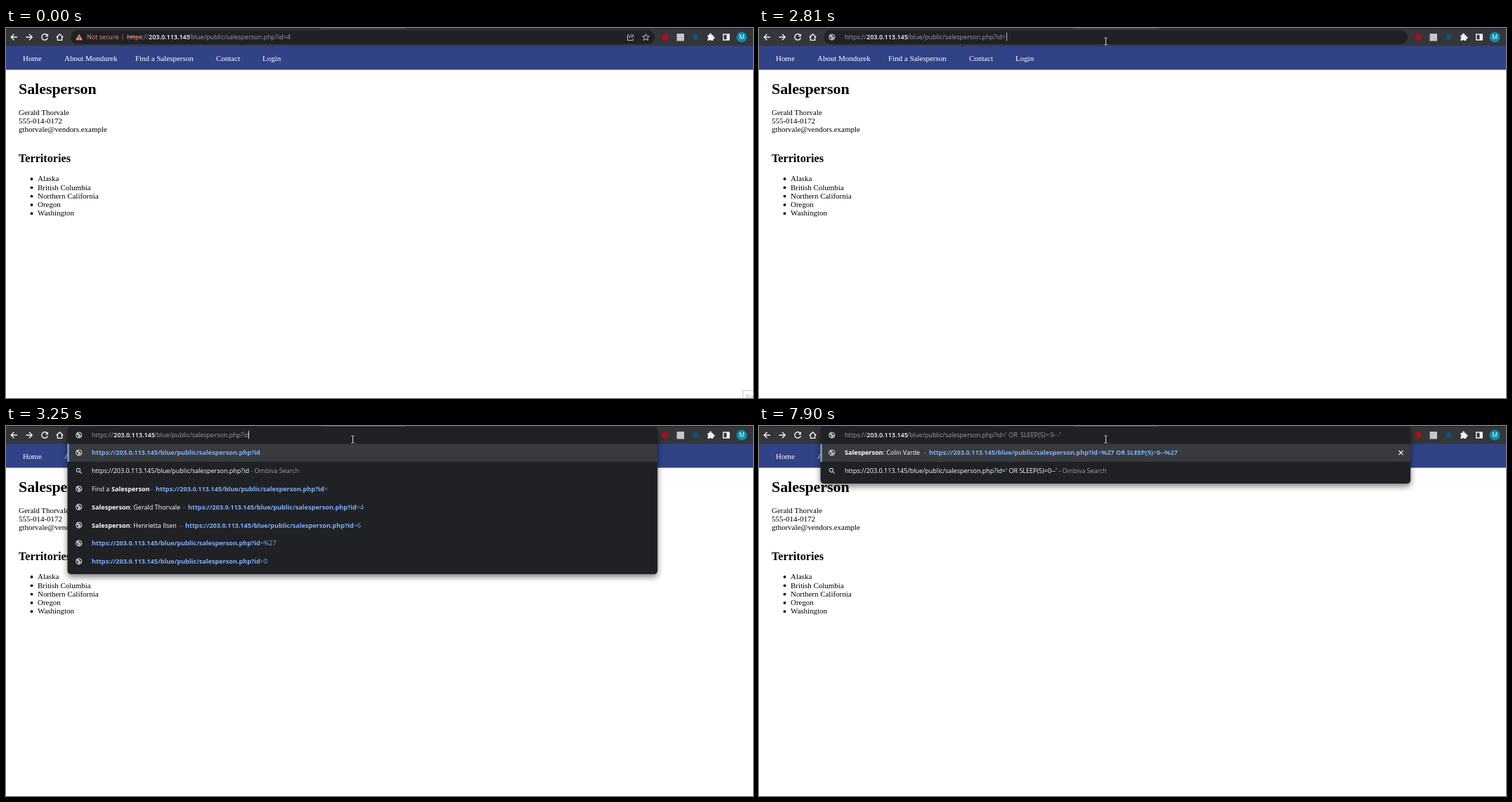
Write an HTML page that moves like this. It is 1063 px wide and 527 px high and loops after 8 s.

```html
<!DOCTYPE html>
<html lang="en">
<head>
<meta charset="utf-8">
<title>Salesperson</title>
<style>
  html, body { margin: 0; width: 100%; height: 100%; overflow: hidden; background: #fff; }
  svg { display: block; }
  text { white-space: pre; }
  .page { font: 10.95px "Liberation Serif", "Times New Roman", serif; fill: #000; }
  .page .nav { fill: #fff; }
  .page .h1 { font-size: 21.9px; font-weight: bold; }
  .page .h2 { font-size: 16.2px; font-weight: bold; }
  .ui { font: 9px "Open Sans", "Noto Sans", sans-serif; fill: #fff; }
  .b { font-size: 9.1px; font-weight: bold; }
  .host { font-weight: 600; fill: #fff; }
  .grey { fill: #9aa0a6; }
  .warn { fill: #ee907f; }
  .strike { text-decoration: line-through; }
  .link { fill: #7cb0ff; }
  .selected tspan { fill: #fff; }
  .line { fill: none; stroke: #f1f3f4; stroke-width: 1.4; }
  #popup { filter: drop-shadow(0 4px 4px rgba(0, 0, 0, .5)); }
</style>
</head>
<body>
<svg width="1063" height="527" viewBox="0 0 1063 527">
  <defs>
    <g id="globe">
      <circle r="4.6" fill="#c4c7cb"/>
      <path d="M-3.6-1.5L-1 .2-.6 2.2-2 3.4Q-4-.2-3.6-1.5ZM0-3.8L3-2 3.6.8 1.6.2.8-1.6-.8-2ZM1 2L3 1.8 1.4 3.6Z" fill="#35373b"/>
    </g>
    <g id="lens" fill="none" stroke="#c4c7cb" stroke-width="1.1">
      <circle cx="-.8" cy="-.8" r="2.6"/><path d="M1.2 1.2L4 4"/>
    </g>
  </defs>

  <g class="page" id="page">
    <rect y="25" width="1063" height="34.500" fill="#324287"/>
  </g>

  <g id="toolbar">
    <rect width="1063" height="25.5" fill="#35363a"/>
    <rect width="1063" height="1" fill="#202124"/>
    <rect x="448" width="120" height="1" fill="#4a4b4f"/>
    <rect id="pill" x="92" y="3" width="831" height="20" rx="10" fill="#202124"/>
    <path class="line" d="M16 13H7.500M11.500 8.800L7.300 13l4.200 4.200M28.500 13H37M33 8.800L37.200 13 33 17.200"/>
    <path class="line" d="M58.600 10.200A4.300 4.300 0 1 0 59.300 14"/>
    <path d="M60 8V12.200H55.800Z" fill="#f1f3f4"/>
    <path class="line" d="M71.800 13.300L76.500 8.700 81.200 13.300M73.400 12V17.400H79.600V12"/>
    <circle cx="938" cy="13" r="4.800" fill="#a3121c"/>
    <rect x="954.500" y="8" width="10.500" height="10.500" fill="#c6c6c6"/>
    <circle cx="981.500" cy="13" r="4.200" fill="#0b5577"/>
    <path d="M998.500 10H1001A1.700 1.700 0 1 1 1004 10H1006.300V12.300A1.700 1.700 0 1 1 1006.300 15.500V18H1003.600A1.500 1.500 0 0 0 1000.800 18H998.500V15.200A1.500 1.500 0 0 0 998.500 12.500Z" fill="#f1f3f4"/>
    <path class="line" d="M1020.700 9H1029V17H1020.700Z"/>
    <rect x="1025.500" y="9" width="4" height="8" fill="#f1f3f4"/>
    <circle cx="1047" cy="13" r="7.600" fill="#078bab"/>
    <text class="ui" x="1047" y="16.300" text-anchor="middle">M</text>
  </g>

  <g id="popup" class="ui"></g>
  <g id="bar" class="ui"></g>
  <rect id="caret" y="6.5" width="1" height="12" fill="#b4b7bb"/>

  <g id="tip">
    <rect x="1048.500" y="516.500" width="30" height="20" fill="#fff" stroke="#c8c8c8"/>
    <text class="ui" x="1053" y="529" style="fill:#aaa">Pa</text>
  </g>
  <path id="arrow" d="M0 0V11.300L2.700 8.900 4.400 12.700 6.200 11.900 4.500 8.200H8Z" fill="#fff" stroke="#222" stroke-width=".7"/>
  <path id="beam" d="M-2.200-5H-.6L0-4.500.6-5H2.200M0-4.500V4.500M-2.200 5H-.6L0 4.500.6 5H2.200" fill="none" stroke="#d5d5d5"/>
</svg>
<script>
const $ = id => document.getElementById(id);
const HOST = "203.0.113.145", PATH = "/blue/public/salesperson.php";
const BASE = "https://" + HOST + PATH;
const OR = "=' OR ", SLEEP = "SLEEP(5", TAIL = ")=0--'";
const STOPS = [404.8, 407.7, 414.3, 419.5, 423.5, 427.5];  // x of each TAIL character

const text = (x, y, s, cls = "") => `<text x="${x}" y="${y}" class="${cls}">${s}</text>`;
const span = (s, cls = "", x) => `<tspan class="${cls}"${x === undefined ? "" : ` x="${x}"`}>${s}</tspan>`;
const use = (id, y) => `<use href="#${id}" x="103.7" y="${y}"/>`;

// Page
const nav = [[24, "Home"], [83, "About Mondurek"], [184, "Find a Salesperson"], [299, "Contact"], [365, "Login"]];
const lines = ["Gerald Thorvale", "555-014-0172", "gthorvale@vendors.example"];
const places = ["Alaska", "British Columbia", "Northern California", "Oregon", "Washington"];
$("page").innerHTML += nav.map(([x, s]) => text(x, 47, s, "nav")).join("")
  + text(18, 94, "Salesperson", "h1")
  + lines.map((s, i) => text(18, 123.5 + 12.3 * i, s)).join("")
  + text(18, 191, "Territories", "h2")
  + places.map((s, i) => {
      const y = 218.2 + 12.3 * i;
      return `<circle cx="36.5" cy="${y - 3.2}" r="1.9"/>` + text(45, y, s);
    }).join("");

// Suggestion rows
const link = (x, q, rest) => span(BASE + q, "link b", x) + span("?id".slice(q.length) + rest, "link");
const dash = x => span("-", "grey", x - 7);
const find = q => span("Find a ", "", 122) + span("Salesperson", "b", 150) + dash(213) + link(213, q, "=");
const person = (name, x, url) => span("Salesperson", "b", 122) + span(": " + name) + dash(x) + url;
const search = s => span(BASE + s, "", 122) + span(" - Ombiva Search", "grey");

function suggestions(typed) {
  const q = typed.replace("=", "");
  const gerald = person("Gerald Thorvale", 259, link(259, q, "=4"));
  const henrietta = person("Henrietta Ilsen", 255, link(255, q, "=6"));
  const ends = [link(122, q, "=%27"), link(122, q, "=0")];
  if (typed.length > 4) return [
    person("Colin Varde", 242, link(242, "?id", "=") + span("%27 OR SLEEP(5)", "link b")
      + span("=", "link") + span("0--%27", "link b")),
    search(typed)];
  if (typed === "?id=") return [find(q), search(typed), gerald, henrietta,
    person("Colin Varde", 242, link(242, q, "=%27 OR SLEEP(3)=0--%27")), ...ends];
  return [span(BASE + q, "link b", 122), search(typed), find(q), gerald, henrietta, ...ends];
}

function popup(typed) {
  const rows = suggestions(typed), closable = typed.includes("=");
  return `<rect x="87.500" y="1" width="839.700" height="${29.5 + 25.8 * rows.length}" rx="5" fill="#202124"/>
    <rect x="87.500" y="25.5" width="839.700" height="25.500" fill="#393a3d"/>
    <rect x="87.500" y="25.5" width="2" height="25.500" fill="#8ab4f8"/>`
    + (closable ? `<path class="line" style="stroke-width:1.1" d="M910.500 35L916.500 41M916.500 35L910.500 41"/>` : "")
    + rows.map((row, i) => {
        const y = 38 + 25.8 * i;
        return use(i === 1 ? "lens" : "globe", y) + `<text y="${y + 3.3}">${row}</text>`;
      }).join("");
}

// Address bar contents
function idleBar(focused, selected) {
  return (focused ? `<rect x="91" y="3" width="833" height="20" rx="10" fill="none" stroke="#8ab4f8" stroke-width="1.600"/>` : "")
    + (selected ? `<rect x="172" y="5" width="236" height="15.500" fill="#185abc"/>` : "")
    + `<path d="M104 8.500L109 17.300H99Z" class="warn"/><path d="M104 11.500V14.300M104 15.200V16.300" stroke="#202124"/>`
    + text(115, 16.3, "Not secure", "warn")
    + `<rect x="165.500" y="8" width="1" height="10" fill="#5f6368"/>`
    + `<text y="16.300" class="${selected ? "selected" : ""}">`
    + span("https", "warn strike", 172) + span("://", "grey") + span(HOST, "host", 203)
    + span(PATH + "?id=4", "grey", 260) + "</text>"
    + `<g fill="none" stroke="#c4c7cb"><path d="M887 10H884.500V17.500H892.500V15.500M886.500 14.500Q887 11 891 11M890 8.500L893.500 11.200 890 14"/>
       <path d="M910.500 8.500L911.800 11.700 915.300 12 912.600 14.200 913.500 17.600 910.500 15.700 907.500 17.600 908.400 14.200 905.700 12 909.200 11.700Z"/></g>`;
}

function editBar(typed) {
  const full = typed.length > 4;
  return use("globe", 13) + `<text y="16.300">` + span("https://", "grey", 122) + span(HOST, "host", 153)
    + span(PATH + (full ? "?id" + OR : typed), "grey", 211)
    + (full ? span(SLEEP, "grey", 372) + span(TAIL, "grey", STOPS.join(" ")) : "") + "</text>";
}

// Timelines: [start, value]
const typing = [[0, ""], [2810, "?id="], [3250, "?id"], [3460, "?i"], [3830, "?"], [4340, "?id" + OR + SLEEP + TAIL]];
const carets = [[0, 0], [2100, 408], [2620, 0], [2810, 352], [3250, 345], [3460, 339], [3830, 337],
  [4340, 429], [4910, 0], [5300, STOPS[5]], [5560, STOPS[4]], [5790, STOPS[3]], [6000, STOPS[2]],
  [6150, STOPS[1]], [6350, STOPS[0]], [6860, 0], [7380, STOPS[0]], [7900, 0]];
const at = (list, t) => list.filter(e => e[0] <= t).pop()[1];
const ease = (t, from, to) => {
  const u = Math.min(1, Math.max(0, (t - from) / (to - from)));
  return 1 - (1 - u) ** 2;
};

let shown;
function draw(t) {
  const typed = at(typing, t), focused = t >= 1440, selected = focused && t < 2100;
  const key = [typed, focused, selected].join();
  if (key !== shown) {
    shown = key;
    $("bar").innerHTML = typed ? editBar(typed) : idleBar(focused, selected);
    $("popup").innerHTML = typed ? popup(typed) : "";
  }
  const step = Math.floor((t + 10) / 20) * 20 - 10;  // motion advances every 20 ms
  $("popup").style.opacity = ease(step, 2810, 2910);

  const caret = at(carets, t);
  $("caret").setAttribute("x", caret);
  $("caret").style.display = caret ? "" : "none";
  $("tip").style.opacity = t < 30 ? 1 : t < 50 ? .5 : 0;

  const a = ease(step, 190, 990), b = ease(step, 1010, 1400);
  const x = 1015 - 516 * a - 5.5 * b, y = 530 - 506 * a - 5 * b;
  const inBar = y < 23;
  for (const [id, on] of [["arrow", t >= 200 && !inBar], ["beam", inBar]]) {
    $(id).style.display = on ? "" : "none";
    $(id).setAttribute("transform", `translate(${x} ${y})`);
  }
}

function tick() {
  draw(performance.now() % 8000);
  requestAnimationFrame(tick);
}
tick();
</script>
</body>
</html>
```
